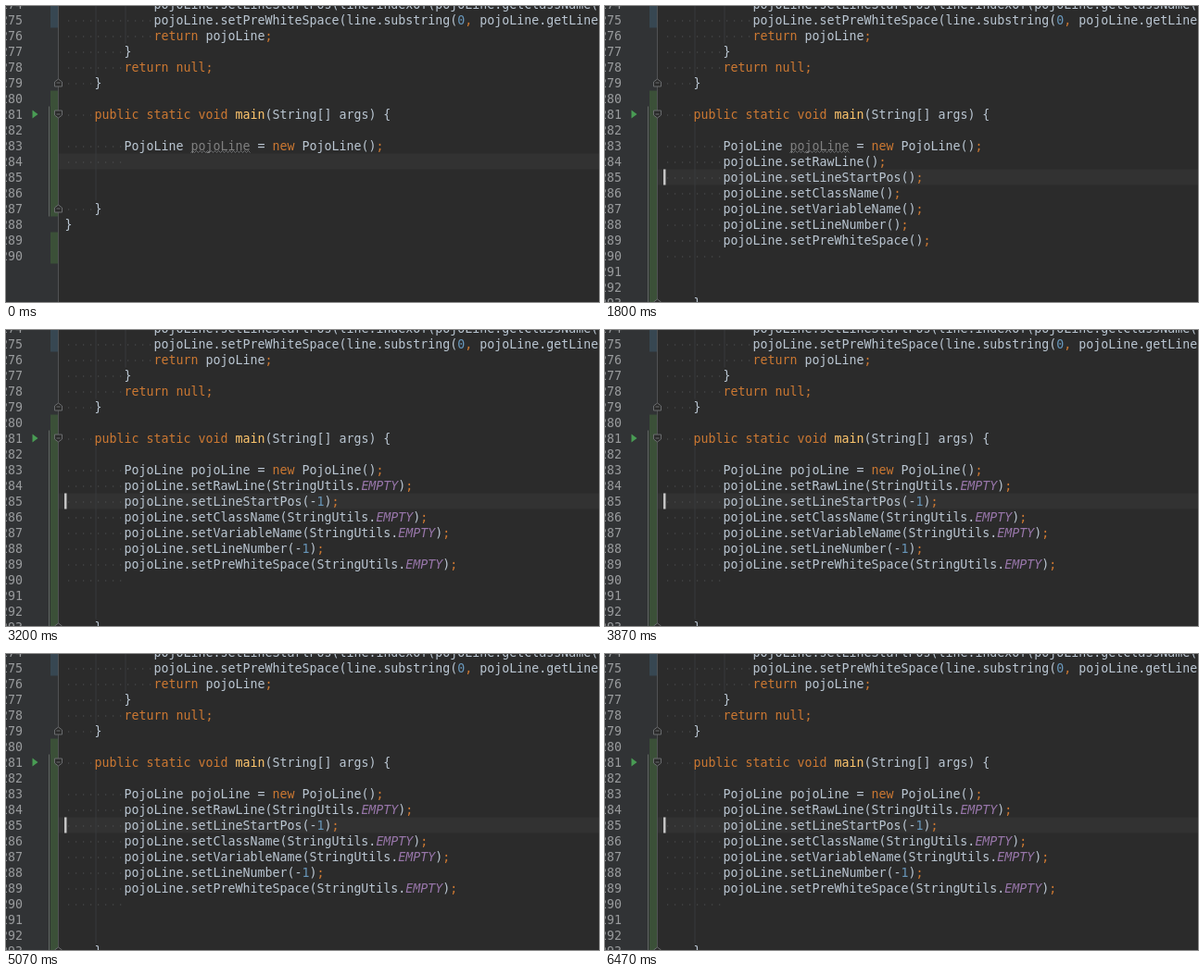
An HTML page for the animation above (6.54 s loop, 640x320 px).

```html
<!DOCTYPE html>
<html lang="en">
<head>
<meta charset="utf-8">
<style>
html, body { margin: 0; width: 100%; height: 100%; overflow: hidden; background: #2b2b2b; }
svg { display: block; }
text { font: 13.29px "DejaVu Sans Mono", monospace; fill: #bac6d2; white-space: pre; }
.num { fill: #999b9d; text-anchor: end; }
.key, .sep { fill: #cc7832; }
.int { fill: #6897bb; }
.method { fill: #ffc66d; }
.const { fill: #9876aa; font-style: italic; }
.unused { fill: #808080; }
.dots { stroke: #505254; stroke-width: 1.2; stroke-dasharray: 1.2 6.8; }
.guide { stroke: #393b3c; }
.fold { fill: #2b2b2b; stroke: #6a6c6e; }
</style>
</head>
<body>
<svg width="640" height="320" viewBox="0 0 640 320"><g id="stage"></g></svg>
<script>
const LOOP = 6540, CHAR = 8, LEFT = 63.5, ROW = 17, FIRST = 274;
const stage = document.getElementById("stage");

const head = [
  "            pojoLine.setLineStartPos(line.indexOf(pojoLine.getClassName(",
  "            pojoLine.setPreWhiteSpace(line.substring(0, pojoLine.getLineStartPos()));",
  "            return pojoLine;",
  "        }",
  "        return null;",
  "    }",
  "",
  "    public static void main(String[] args) {",
  "",
  "        PojoLine pojoLine = new PojoLine();"
];
const setters = ["RawLine", "LineStartPos", "ClassName", "VariableName", "LineNumber", "PreWhiteSpace"];
const tail = ["        ", "", "", "    }", "}", "", ""];

const rowTop = line => (line - FIRST) * ROW - 10.5;
const rect = (x, y, w, h, fill) => `<rect x="${x}" y="${y}" width="${w}" height="${h}" fill="${fill}"/>`;
const vline = (x, y1, y2, attrs) => `<path d="M${x} ${y1}V${y2}" ${attrs}/>`;

function wave(line, col, length, color) {
  let d = `M${LEFT + col * CHAR} ${rowTop(line) + 16}`;
  for (let i = 0; i < length * CHAR / 4; i++) d += "l2-2 2 2";
  return `<path d="${d}" fill="none" stroke="${color}" stroke-width=".9"/>`;
}

function fold(line, dir) {
  const y = rowTop(line) + 8.5;
  const s = dir * 4;
  return `<path class="fold" d="M52.5 ${y - s}H60.5V${y + s / 4}L56.5 ${y + s}L52.5 ${y + s / 4}Z"/>
    <path d="M54.5 ${y}h4" stroke="#6a6c6e"/>`;
}

function colorize(code, used) {
  const tokens = /\b(public|static|void|return|null|new)\b|([;,])|(\d+)|\b(main)\b|\b(EMPTY)\b|(pojoLine(?= =))/g;
  const classes = ["key", "sep", "int", "method", "const", used ? "" : "unused"];
  return code.replace(tokens, (token, ...groups) => {
    const kind = groups.slice(0, classes.length).findIndex(Boolean);
    return `<tspan class="${classes[kind]}">${token}</tspan>`;
  });
}

function codeRow(code, line, used) {
  const indent = code.search(/\S|$/);
  const y = rowTop(line);
  const dots = indent
    ? `<path class="dots" d="M${LEFT + 3.5} ${y + 9.5}h${indent * CHAR - 4}"/>` : "";
  return dots +
    `<text class="num" x="18" y="${y + 13.2}">${line}</text>` +
    `<text x="${LEFT + indent * CHAR}" y="${y + 13.2}">${colorize(code.trim(), used)}</text>`;
}

function setterCode(name, filled) {
  const value = /Pos|Number/.test(name) ? "-1" : "StringUtils.EMPTY";
  return `        pojoLine.set${name}(${filled ? value : ""});`;
}

function picture({ current, caret, inserted, used, filled }) {
  const body = inserted ? setters.map(name => setterCode(name, filled)) : [];
  const lines = [...head, ...body, ...tail];
  const end = 287 + body.length;
  const bars = rect(48, 0, 8, rowTop(276), "#374752") +
    rect(48, rowTop(280), 8, rowTop(end + 1) - rowTop(280), "#3b5038") +
    rect(48, rowTop(end + 2), 8, 2 * ROW, "#3b5038");
  const guides = vline(97, 0, rowTop(279), 'class="guide"') +
    vline(129, 0, rowTop(277), 'class="guide"') +
    vline(97, rowTop(282), rowTop(end), 'class="guide"');
  const marks = inserted && used && !filled
    ? setters.map((name, i) => wave(284 + i, 20 + name.length - 8 + 4 + 3 - 7 + 8, 2, "#a94a45")).join("") : "";

  return rect(0, 0, 56, 320, "#313335") +
    rect(57, rowTop(current), 583, ROW, "#323232") +
    bars + guides +
    vline(56.5, 0, 320, 'stroke="#505254"') +
    vline(46.5, rowTop(281), rowTop(end + 1), 'stroke="#616963"') +
    `<path d="M28.5 ${rowTop(281) + 4}l6 4.5-6 4.5z" fill="#499c54"/>` +
    fold(279, -1) + fold(281, 1) + fold(end, -1) +
    lines.map((code, i) => codeRow(code, FIRST + i, used)).join("") +
    (used ? "" : wave(283, 17, 8, "#77797b")) + marks +
    (caret ? rect(63, rowTop(current), 2.5, ROW, "#c4c4c4") : "");
}

function stateAt(t) {
  const moved = t >= 330;
  return {
    current: moved ? 285 : 284,
    caret: moved,
    inserted: t >= 1700,
    used: t >= 2130,
    filled: t >= 2930 && t < 4130 || t >= 4800
  };
}

let shown = "";
function update(now) {
  const state = stateAt(now % LOOP);
  const key = JSON.stringify(state);
  if (key !== shown) {
    stage.innerHTML = picture(state);
    shown = key;
  }
}

const start = performance.now();
function tick() {
  update(performance.now() - start);
  requestAnimationFrame(tick);
}
tick();
</script>
</body>
</html>
```
